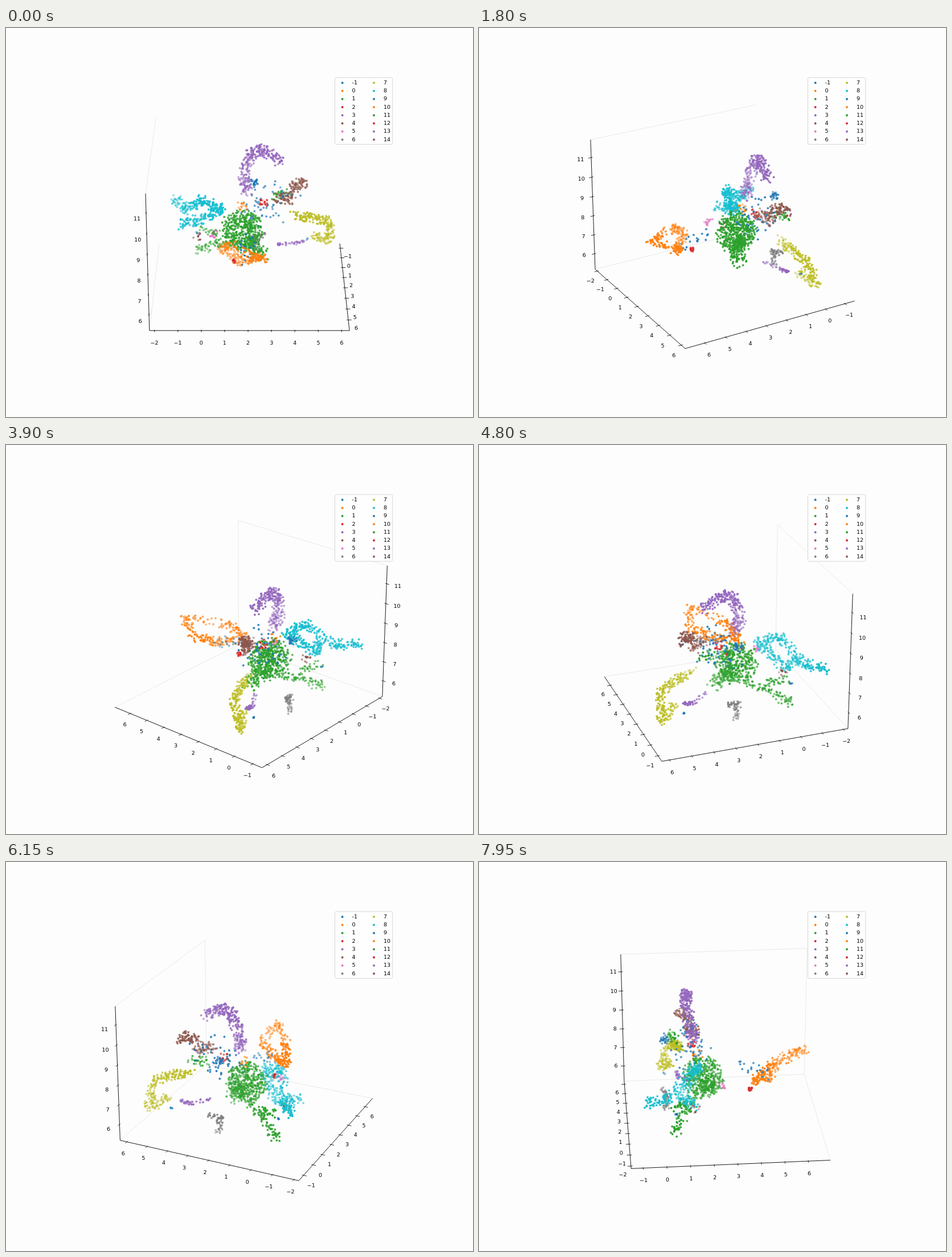
An HTML page with a canvas that plays this animation: 820 px wide and 683 px high, repeating every 8000 ms.

```html
<!DOCTYPE html>
<html lang="en">
<head>
<meta charset="utf-8">
<title>Rotating 3D scatter</title>
<style>
html, body { margin: 0; width: 100%; height: 100%; overflow: hidden; background: #fdfdfd; }
canvas { display: block; }
</style>
</head>
<body>
<canvas id="c" width="820" height="683"></canvas>
<script>
const g = document.getElementById('c').getContext('2d');
const COLORS = ['#1f77b4', '#ff7f0e', '#2ca02c', '#d62728', '#9467bd',
  '#8c564b', '#e377c2', '#7f7f7f', '#bcbd22', '#17becf'];
const CX = 427.5, CY = 337.6, DIST = 2968, STEP = 150, LOOP = 8000;
const H = 169.7, HZ = 127.3, RAD = Math.PI / 180;
const SE = Math.sin(25 * RAD), CE = Math.cos(25 * RAD);
const color = id => COLORS[(id + 1) % 10];

let seed = 7;
function rnd() {
  seed = (seed * 1664525 + 1013904223) >>> 0;
  return seed / 4294967296;
}

// Fills a round tube along a path of [x, y, z] nodes; one node gives a ball.
const clusters = Array.from({ length: 16 }, (_, i) => ({ id: i - 1, pts: [] }));
function tube(id, count, radius, ...nodes) {
  const last = nodes.length - 1;
  for (let i = 0; i < count; i++) {
    const t = rnd() * last, k = Math.floor(t);
    const p = nodes[k], q = nodes[Math.min(k + 1, last)];
    const r = radius * Math.cbrt(rnd()), turn = rnd() * 2 * Math.PI, up = rnd() * 2 - 1;
    const flat = r * Math.sqrt(1 - up * up);
    const off = [flat * Math.cos(turn), flat * Math.sin(turn), r * up];
    clusters[id + 1].pts.push(p.map((v, d) => v + (q[d] - v) * (t - k) + off[d]));
  }
}

tube(-1, 50, 40, [55, 60, 25], [5, 45, -25]);
tube(-1, 18, 14, [-10, -85, -35], [0, -30, -20]);
tube(-1, 3, 3, [104, 98, -84]);
tube(-1, 3, 3, [-95, 88, -65]);
tube(0, 220, 10, [10, -147, -2], [-35, -80, -8], [-47, -50, -32],
  [-17, -83, -40], [28, -103, -22], [10, -147, -2]);
tube(1, 380, 38, [-15, 37, -32], [-9, 33, -40]);
tube(1, 95, 16, [-5, 32, -55], [22, 19, -77]);
tube(1, 85, 11, [-20, 50, -60], [-95, 90, -103]);
tube(1, 25, 11, [-55, 72, -66], [-88, 91, -58]);
tube(2, 14, 4, [-27, -47, -57]);
tube(3, 250, 12, [57, 57, 87], [23, 62, 108], [2, 64, 100], [-11, 58, 56], [-2, 46, 30]);
tube(4, 10, 9, [-94, 55, -58]);
tube(5, 14, 6, [-66, 3, -36], [-58, 10, -26]);
tube(6, 52, 7, [28, 106, -77], [8, 99, -83], [12, 100, -107]);
tube(7, 215, 10, [77, 66, -22], [115, 76, -30], [144, 86, -43], [147, 104, -88], [118, 85, -72]);
tube(8, 310, 11, [-140, 142, -20], [-113, 100, -25], [-84, 57, 14], [-50, 44, 1],
  [-84, 79, -35], [-127, 60, -36]);
tube(9, 24, 9, [8, 101, 28]);
tube(10, 14, 12, [-15, 46, 5]);
tube(11, 26, 9, [42, 80, 12], [70, 90, 12]);
tube(12, 16, 9, [26, 51, 12]);
tube(13, 36, 4, [52, 56, -72], [78, 72, -81], [100, 76, -77]);
tube(14, 130, 12, [100, 72, 40], [82, 60, 44], [68, 53, 14], [48, 42, 24]);

let sa, ca;
function project([x, y, z]) {
  const fwd = ca * x + sa * y;
  const w = CE * fwd + SE * z, s = DIST / (DIST - w);
  return [CX + (ca * y - sa * x) * s, CY - (CE * z - SE * fwd) * s, w];
}

function line(p, q, style, width) {
  const [x1, y1] = project(p), [x2, y2] = project(q);
  g.strokeStyle = style;
  g.lineWidth = width;
  g.beginPath();
  g.moveTo(x1, y1);
  g.lineTo(x2, y2);
  g.stroke();
}

const moved = (p, d, v) => p.map((o, i) => i === d ? v : o);

// Axis along dimension d for values first..last, with zero at v0.
function axis(base, d, half, tickDim, first, last, v0, scale) {
  line(moved(base, d, -half), moved(base, d, half), '#000', 0.9);
  const sign = Math.sign(base[tickDim]);
  for (let v = first; v <= last; v++) {
    const p = moved(base, d, (v - v0) * scale);
    line(moved(p, tickDim, p[tickDim] + 5.6 * sign),
      moved(p, tickDim, p[tickDim] - 2.8 * sign), '#000', 0.8);
    const label = p.map((o, i) => i === d ? o : o + Math.sign(o) * (i < 2 ? 14 : 10.6));
    const [x, y] = project(label);
    g.fillStyle = '#000';
    g.fillText(String(v).replace('-', '\u2212'), x, y + 8.2);
  }
}

function dot(x, y) {
  g.beginPath();
  g.arc(x, y, 1.95, 0, 7);
  g.fill();
}

function drawBox(az) {
  const a = az <= 90 ? H : -H, b = az > 0 ? H : -H;
  const pane = (p, q) => line(p, q, '#e7e7e7', 0.9);
  for (const z of [HZ, -HZ]) pane([-a, -H, z], [-a, H, z]);
  if (az > 0) {
    pane([-a, -H, -HZ], [-a, -H, HZ]);
    pane([-H, -H, -HZ], [H, -H, -HZ]);
  }
  g.textAlign = 'center';
  axis([0, b, -HZ], 0, H, 1, -2, 6, 2.06, 39.65);
  axis([a, 0, -HZ], 1, H, 0, -1, 6, 2.7175, -40.2);
  axis([-a, b, 0], 2, HZ, 1, 6, 11, 8.535, 37.83);
}

// Nearer clusters cover farther ones; points fade with depth inside a cluster.
function drawPoints() {
  const layers = clusters.map(({ id, pts }) => {
    const list = pts.map(project).sort((p, q) => p[2] - q[2]);
    return { id, list, far: list[0][2], near: list.at(-1)[2] };
  }).sort((p, q) => p.near - q.near);
  for (const { id, list, far, near } of layers) {
    g.fillStyle = color(id);
    for (const [x, y, w] of list) {
      g.globalAlpha = 0.42 + 0.58 * (w - far) / (near - far);
      dot(x, y);
    }
  }
  g.globalAlpha = 1;
}

function drawLegend() {
  g.beginPath();
  g.roundRect(577.5, 87, 101.2, 117.3, 2.5);
  g.fillStyle = 'rgba(255,255,255,.8)';
  g.fill();
  g.strokeStyle = '#d4d4d4';
  g.lineWidth = 0.95;
  g.stroke();
  g.textAlign = 'left';
  clusters.forEach(({ id }, i) => {
    const x = i < 8 ? 590.6 : 646, y = 96.3 + (i % 8) * 14.24;
    g.fillStyle = color(id);
    dot(x, y);
    g.fillStyle = '#000';
    g.fillText(id, x + 17, y + 2.7);
  });
}

function frame() {
  const az = -90 + 5 * Math.floor(performance.now() % LOOP / STEP);
  sa = Math.sin(az * RAD);
  ca = Math.cos(az * RAD);
  g.fillStyle = '#fdfdfd';
  g.fillRect(0, 0, 820, 683);
  g.font = '9.5px "DejaVu Sans", sans-serif';
  drawBox(az);
  drawPoints();
  drawLegend();
  requestAnimationFrame(frame);
}
frame();
</script>
</body>
</html>
```
